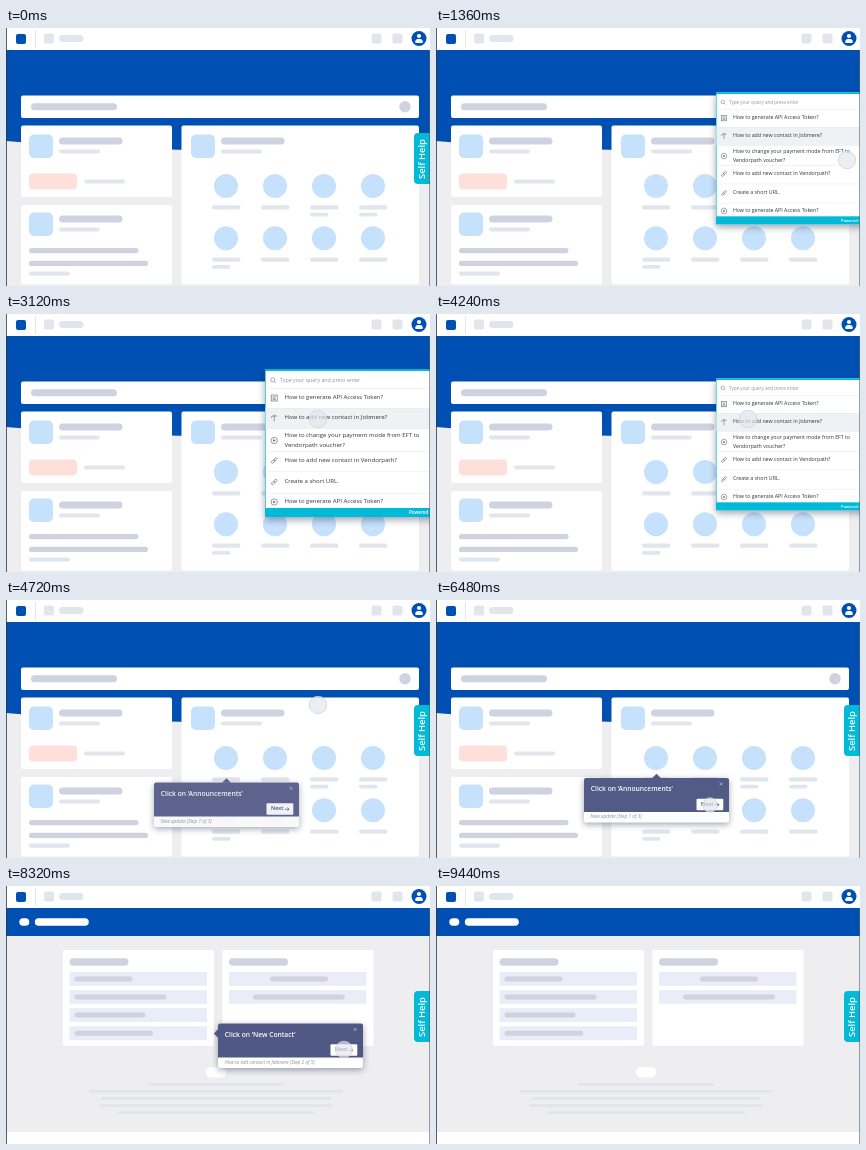
These frames come from a looping animation (424x258 px, 9.6 s). An HTML page with a canvas:

```html
<!DOCTYPE html>
<html lang="en">
<head>
<meta charset="utf-8">
<title>Self help walkthrough</title>
<style>
html, body { margin: 0; width: 100%; height: 100%; overflow: hidden; background: #fff; }
canvas { display: block; width: 424px; height: 258px; }
</style>
</head>
<body>
<canvas id="stage"></canvas>
<script>
const W = 424, H = 258, LOOP = 9600, STEP = 80;
const BLUE = '#0050b3', SKY = '#c6e1fb', DARK = '#ced3df', LIGHT = '#e1e5ec';
const CYAN = '#00bad8', GREY = '#eeeef0', NAVY = '#4f5784';
const FONT = '"Open Sans", "Noto Sans", sans-serif';

const canvas = document.getElementById('stage');
const ctx = canvas.getContext('2d');
const ratio = window.devicePixelRatio || 1;
canvas.width = W * ratio;
canvas.height = H * ratio;

const lerp = (a, b, k) => a + (b - a) * k;
const span = (t, a, b) => Math.min(1, Math.max(0, (t - a) / (b - a)));
const smooth = k => k * k * (3 - 2 * k);
const easeOut = k => 1 - (1 - k) * (1 - k);

function rect(x, y, w, h, color) {
  ctx.fillStyle = color;
  ctx.fillRect(x, y, w, h);
}

function box(x, y, w, h, r, color) {
  ctx.fillStyle = color;
  ctx.beginPath();
  ctx.roundRect(x, y, w, h, r);
  ctx.fill();
}

const bar = (x, y, w, h, color) => box(x, y, w, h, h / 2, color);

function disc(x, y, r, color) {
  ctx.fillStyle = color;
  ctx.beginPath();
  ctx.arc(x, y, r, 0, Math.PI * 2);
  ctx.fill();
}

function shape(points, color) {
  ctx.fillStyle = color;
  ctx.beginPath();
  points.forEach(([x, y]) => ctx.lineTo(x, y));
  ctx.fill();
}

function line(...coords) {
  ctx.beginPath();
  for (let i = 0; i < coords.length; i += 2) ctx.lineTo(coords[i], coords[i + 1]);
  ctx.stroke();
}

function ring(x, y, r) {
  ctx.beginPath();
  ctx.arc(x, y, r, 0, Math.PI * 2);
  ctx.stroke();
}

function pen(color, width) {
  ctx.strokeStyle = color;
  ctx.lineWidth = width;
}

function text(str, x, y, size, color, style = '400', align = 'left') {
  ctx.font = `${style} ${size}px ${FONT}`;
  ctx.fillStyle = color;
  ctx.textAlign = align;
  ctx.textBaseline = 'middle';
  ctx.fillText(str, x, y);
}

function shadow(blur, dy, color) {
  ctx.shadowBlur = blur * ratio;
  ctx.shadowOffsetY = dy * ratio;
  ctx.shadowColor = color;
}

const noShadow = () => { ctx.shadowColor = 'transparent'; };

function navBar() {
  rect(0, 0, W, 22, '#fff');
  box(10, 6, 10, 10, 2, BLUE);
  rect(29, 2, 1, 18, '#e4e6ea');
  for (const x of [38, 365.5, 386.5]) box(x, 5.5, 10, 10, 2, LIGHT);
  bar(53, 7, 24.5, 7, LIGHT);
  disc(413, 10.5, 7.5, BLUE);
  disc(413, 8, 2.1, '#fff');
  box(409.2, 11, 7.6, 4, [3.5, 3.5, 1, 1], '#fff');
}

function edges() {
  rect(0, 0, 0.8, H, '#34373d');
  rect(W - 0.6, 22, 0.6, H - 22, '#5b6069');
}

function selfHelpTab() {
  box(408, 105, 20, 51, 4, CYAN);
  ctx.save();
  ctx.translate(416.8, 131);
  ctx.rotate(-Math.PI / 2);
  text('Self Help', 0, 0, 9.4, '#fff', '600', 'center');
  ctx.restore();
}

function cardHead(x, y) {
  box(x, y, 24, 23.5, 5, SKY);
  bar(x + 30, y + 3, 63.5, 7, DARK);
  bar(x + 30, y + 15, 41, 4, LIGHT);
}

function homePage() {
  rect(0, 0, W, H, GREY);
  ctx.fillStyle = BLUE;
  ctx.beginPath();
  ctx.moveTo(0, 22);
  ctx.lineTo(0, 113);
  ctx.quadraticCurveTo(150, 126, W, 123);
  ctx.lineTo(W, 22);
  ctx.fill();
  navBar();

  box(15, 67.5, 398, 22.5, 2, '#fff');
  bar(25, 75.2, 86, 7, DARK);
  disc(399, 78.7, 5.7, DARK);

  box(15, 97.5, 151, 71.5, 2, '#fff');
  cardHead(23, 106.5);
  box(23, 145.5, 48, 16, 4, '#ffdfd9');
  bar(78, 151.5, 41, 4, LIGHT);

  box(15, 177, 151, 79.5, 2, '#fff');
  cardHead(23, 184.5);
  bar(23, 220, 109.5, 5.2, DARK);
  bar(23, 232.8, 119, 5.2, DARK);
  bar(23, 243.5, 41, 4.2, LIGHT);

  box(175.5, 97.5, 237.5, 159, 2, '#fff');
  cardHead(185, 106.5);
  for (let row = 0; row < 2; row++) {
    for (let col = 0; col < 4; col++) {
      const x = 220 + col * 49, y = 158 + row * 52.3;
      disc(x, y, 12, SKY);
      bar(x - 14, y + 19.3, 28.5, 4.2, LIGHT);
      if (row === 0 ? col > 1 : col === 0) bar(x - 14, y + 26.8, 18.5, 3.6, LIGHT);
    }
  }
}

function contactPage() {
  rect(0, 0, W, H, GREY);
  rect(0, 246, W, 12, '#fff');
  navBar();
  rect(0, 22, W, 28, BLUE);
  bar(13.3, 32.2, 10, 7.6, '#fff');
  bar(28.8, 32.2, 54, 7.6, '#fff');

  for (const x of [57, 216.5]) {
    box(x, 64, 151, 96, 1.5, '#fff');
    bar(x + 6.5, 72.2, 59, 7.6, DARK);
  }
  [58, 92, 71, 78.5].forEach((w, i) => {
    const y = 86 + i * 18.1;
    rect(63.5, y, 137.5, 13.7, '#e8edf7');
    bar(68.5, y + 4.4, w, 5, DARK);
  });
  [58, 92].forEach((w, i) => {
    const y = 86 + i * 18.1;
    rect(223, y, 137.5, 13.7, '#ebecf7');
    bar(293 - w / 2, y + 4.4, w, 5, DARK);
  });

  bar(199.7, 181, 20.5, 10.5, '#fff');
  [[142, 278], [83, 337], [95, 325], [93, 327], [111, 309]].forEach(([a, b], i) =>
    bar(a, 197 + i * 7.05, b - a, 2.8, '#e1e4eb'));
}

const icons = {
  doc(x, y) {
    ctx.strokeRect(x - 3, y - 3, 6, 6);
    for (const d of [-1.2, 0.2, 1.6]) line(x - 1.6, y + d, x + 1.6, y + d);
  },
  sign(x, y) {
    line(x, y - 3.5, x, y + 3.5);
    line(x - 3, y, x - 2, y - 2, x + 3, y - 2);
  },
  play(x, y) {
    ring(x, y, 3.2);
    shape([[x - 1, y - 1.5], [x + 1.6, y], [x - 1, y + 1.5]], '#6b727c');
  },
  link(x, y) {
    ctx.save();
    ctx.translate(x, y);
    ctx.rotate(-Math.PI / 4);
    for (const d of [-3.4, -0.2]) {
      ctx.beginPath();
      ctx.roundRect(d, -1.1, 3.6, 2.2, 1.1);
      ctx.stroke();
    }
    ctx.restore();
  }
};

const queries = [
  ['doc', 84, 'How to generate API Access Token?'],
  ['sign', 104, 'How to add new contact in Jobmere?'],
  ['play', 126.5, 'How to change your payment mode from EFT to', 'Vendorpath voucher?'],
  ['link', 146.5, 'How to add new contact in Vendorpath?'],
  ['link', 168, 'Create a short URL.'],
  ['play', 188, 'How to generate API Access Token?']
];

function helpPanel(zoom, slide) {
  ctx.save();
  ctx.translate(418 + slide, 141);
  ctx.scale(lerp(0.868, 1, zoom), lerp(0.893, 1, zoom));
  ctx.translate(-418, -141);
  shadow(7, 3, 'rgba(20,30,60,.4)');
  box(259, 55, 182, 148, 1, '#fff');
  noShadow();
  rect(259, 55, 182, 2, CYAN);
  rect(259, 55, 0.7, 148, CYAN);
  rect(259.7, 94, 181, 20.5, '#eff2f4');
  for (const y of [74.5, 94, 114.5, 137, 157.5, 179]) rect(259.7, y, 181, 0.5, '#e3e6ea');

  pen('#858b95', 0.7);
  ring(266.8, 65.8, 2);
  line(268.3, 67.3, 269.8, 68.8);
  text('Type your query and press enter', 274, 66.3, 5.3, '#8d929b');

  for (const [icon, y, first, second] of queries) {
    pen('#6b727c', 0.7);
    icons[icon](268.2, y);
    text(first, 278.5, second ? y - 4.6 : y - 0.3, 6.05, '#30343c');
    if (second) text(second, 278.5, y + 4.6, 6.05, '#30343c');
  }
  rect(259, 194, 182, 9, CYAN);
  text('Powered by', 403, 198.6, 4.6, '#fff', '600');
  ctx.restore();
}

function tooltip(x, y, title, note, arrow, alpha) {
  if (alpha <= 0) return;
  ctx.save();
  ctx.globalAlpha = alpha;
  ctx.translate(x, y);
  shadow(6, 2, 'rgba(20,25,60,.4)');
  box(0, 0, 145, 44.5, 2, '#fff');
  noShadow();
  box(0, 0, 145, 34, [2, 2, 0, 0], NAVY);
  shape(arrow, NAVY);
  text(title, 6.8, 11.7, 6.7, '#fff', '600');
  pen('#d7daea', 0.6);
  line(135.6, 4.4, 138.6, 7.4);
  line(138.6, 4.4, 135.6, 7.4);
  box(112.5, 20.7, 26.8, 11.5, 1, '#fff');
  text('Next', 117, 26.5, 5.4, '#3c4365', '600');
  pen('#3c4365', 0.7);
  line(130.8, 26.7, 135, 26.7);
  line(133.4, 25.1, 135, 26.7, 133.4, 28.3);
  text(note, 6.6, 39.2, 4.75, '#8b8f9b', 'italic 400');
  ctx.restore();
}

// Each move: start, end, target x, target y
const moves = [
  [240, 720, 411, 132],
  [1920, 2880, 312, 105],
  [4960, 5360, 274, 205],
  [6640, 6800, 273, 207],
  [7280, 7680, 338, 163.5]
];
const clicks = [800, 3840, 6440, 8480];

function pointer(t) {
  const alpha = span(t, 80, 320) * (1 - span(t, 8880, 9040));
  if (alpha <= 0) return;
  let x = 330, y = 240;
  for (const [a, b, tx, ty] of moves) {
    const k = smooth(span(t, a, b));
    x = lerp(x, tx, k);
    y = lerp(y, ty, k);
  }
  const press = Math.max(...clicks.map(c => 1 - Math.min(1, Math.abs(t - c) / 200)));
  ctx.save();
  ctx.globalAlpha = alpha;
  disc(x, y, 9 - 2 * press, 'rgba(228,230,238,.68)');
  pen('rgba(203,208,222,.85)', 0.8);
  ring(x, y, 8.7 - 2 * press);
  ctx.restore();
}

function draw(t) {
  ctx.setTransform(ratio, 0, 0, ratio, 0, 0);
  const home = t < 6800;
  if (home) homePage(); else contactPage();
  selfHelpTab();

  if (t >= 880 && t < 4480) {
    const zoom = smooth(span(t, 1360, 1840)) * (1 - smooth(span(t, 4000, 4240)));
    const slide = 155 * (1 - easeOut(span(t, 800, 1360)) + span(t, 4240, 4480) ** 2);
    helpPanel(zoom, slide);
  }
  if (home) {
    const enter = span(t, 4480, 4800);
    tooltip(148, 178 + 18 * (1 - enter), 'Click on ‘Announcements’', 'New update (Step 1 of 3)',
      [[68, 0.2], [72.5, -4.2], [77, 0.2]], easeOut(enter) * (1 - span(t, 6480, 6640)) * 0.98);
  } else {
    const enter = span(t, 6880, 7200);
    tooltip(212 + 12 * (1 - enter), 137.5, 'Click on ‘New Contact’',
      'How to edit contact in Jobmere (Step 2 of 5)',
      [[0.2, 5.5], [-4.2, 10], [0.2, 14.5]], easeOut(enter) * (1 - span(t, 8880, 9040)));
  }
  pointer(t);
  edges();
}

const start = performance.now();
function tick() {
  const t = (performance.now() - start) % LOOP;
  draw(Math.floor(t / STEP) * STEP);
  requestAnimationFrame(tick);
}
tick();
</script>
</body>
</html>
```
